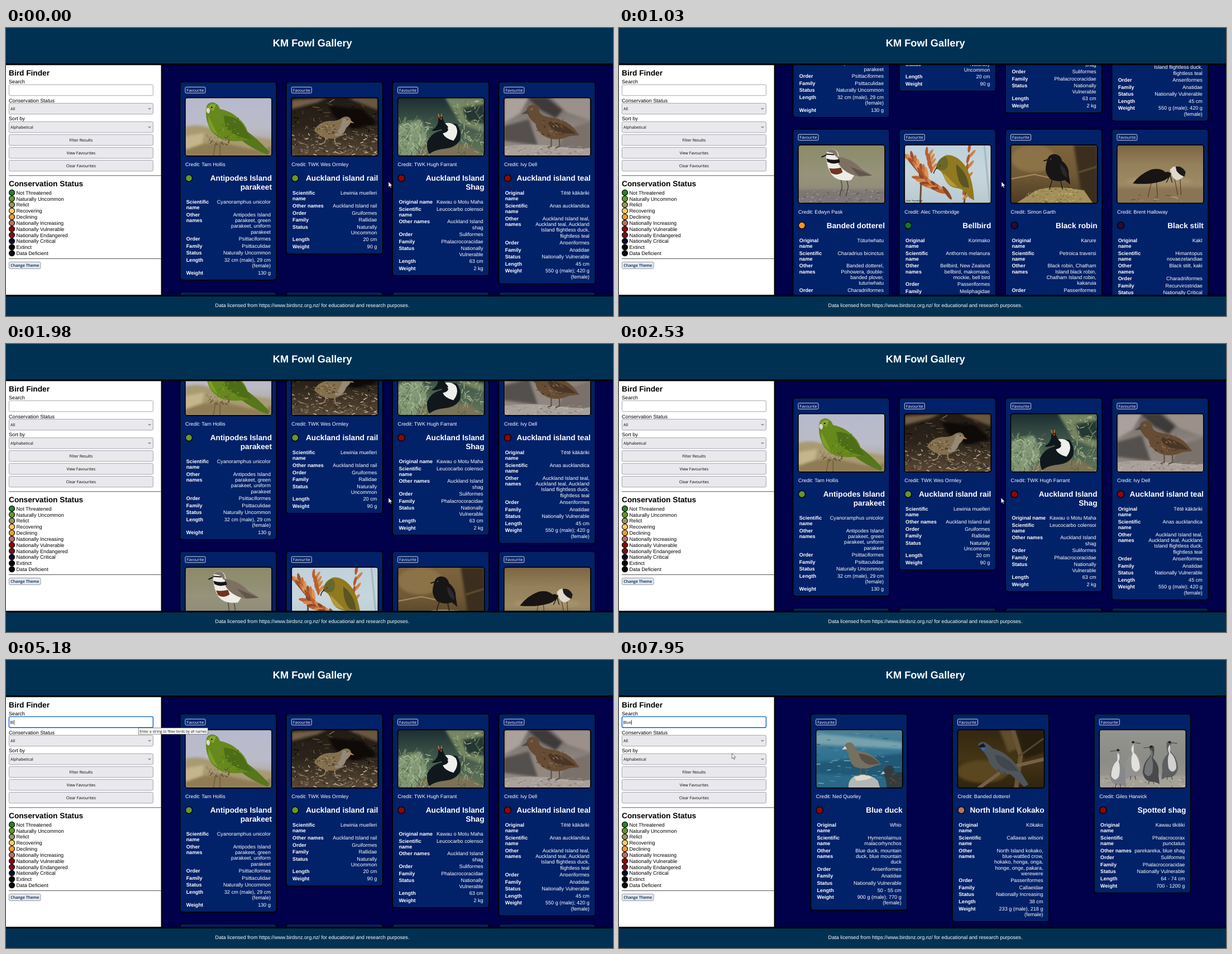
These frames come from a looping animation (1087x515 px, 8 s). An HTML page:

```html
<!DOCTYPE html>
<html lang="en">
<head>
<meta charset="utf-8">
<title>Bird list</title>
<style>
html, body { margin: 0; width: 100%; height: 100%; overflow: hidden; background: #00004b; }
svg { display: block; }
#stage { width: 100%; height: 100%; }
text { font: 9.12px "Liberation Sans", Arial, sans-serif; fill: #000; text-rendering: geometricPrecision; }
.w { fill: #fff; }
.b { font-weight: bold; }
.h { font-size: 13.7px; font-weight: bold; }
.big { font-size: 18.25px; font-weight: bold; }
.ui { font: 500 7.1px "Open Sans", "Noto Sans", sans-serif; }
.theme { font-weight: 600; fill: #012145; }
.tip { font-size: 6.5px; }
.mark { font-size: 3.6px; }
.soft { filter: blur(2px); }
</style>
</head>
<body>
<svg id="stage" viewBox="0 0 1087 515"></svg>
<script>
const LINE = 10.25, GAP = 2.3;
let ids = 0, seed = 7;
const rnd = () => (seed = (seed * 16807) % 2147483647) / 2147483647;

// Drawing helpers, all returning SVG markup
const text = (x, y, s, cls = '', anchor = 'start', more = '') =>
  `<text x="${x}" y="${y}" class="${cls}" text-anchor="${anchor}" ${more}>${s}</text>`;
const rect = (x, y, w, h, fill, more = '') =>
  `<rect x="${x}" y="${y}" width="${w}" height="${h}" fill="${fill}" ${more}/>`;
const shape = (fill, d) => `<path d="${d}" fill="${fill}"/>`;
const line = (color, w, d) =>
  `<path d="${d}" fill="none" stroke="${color}" stroke-width="${w}" stroke-linecap="round" stroke-linejoin="round"/>`;
const oval = (fill, x, y, rx, ry = rx, turn = 0) =>
  `<ellipse cx="${x}" cy="${y}" rx="${rx}" ry="${ry}" fill="${fill}" transform="rotate(${turn} ${x} ${y})"/>`;
const soft = (...parts) => `<g class="soft">${parts.join('')}</g>`;
function sky(...colors) {
  const id = 'g' + ids++;
  const stops = colors.map((c, i) => `<stop offset="${i / (colors.length - 1)}" stop-color="${c}"/>`).join('');
  return `<linearGradient id="${id}" x2="0" y2="1">${stops}</linearGradient>` + rect(0, 0, 154, 103, `url(#${id})`);
}
function specks(n, colors, x, y, w, h, len, tall = 0.4) {
  let out = '';
  for (let i = 0; i < n; i++) {
    const a = x + rnd() * w, b = y + rnd() * h, dx = (rnd() - 0.5) * len, dy = (rnd() - 0.5) * len * tall;
    out += line(colors[i % colors.length], 0.6 + rnd() * 1.2, `M${a.toFixed(1)} ${b.toFixed(1)}l${dx.toFixed(1)} ${dy.toFixed(1)}`);
  }
  return out;
}
// Petals fanned out along a straight stem
function petals(n, colors, x1, y1, x2, y2, size, turn) {
  let out = '';
  for (let i = 0; i < n; i++) {
    const u = i / (n - 1), side = i % 2 ? 1 : -1;
    out += oval(colors[i % colors.length], x1 + (x2 - x1) * u + side * size * 0.3, y1 + (y2 - y1) * u - rnd() * 4,
      size * (0.8 + rnd() * 0.4), size * 0.28, turn + side * 18 + rnd() * 16);
  }
  return out;
}

const pics = {
  parakeet: () => sky('#b7b9cd', '#bbbcc9', '#a79c80') +
    soft(shape('#a89a72', 'M0 52Q24 44 50 56T100 66L154 74V103H0Z'), shape('#8f7c55', 'M0 88Q50 74 96 86T154 84V103H0Z'),
      shape('#c4b58c', 'M0 68L34 62L30 82L0 92Z')) +
    line('#6e6037', 1.6, 'M54 80L50 103M62 80L62 103') +
    shape('#56771b', 'M88 58L108 58Q128 72 149 95L147 101Q118 90 98 74Z') +
    shape('#66881c', 'M37 22Q37 8 49 8Q58 9 62 20Q86 24 104 46Q114 60 112 74Q88 80 66 74Q46 64 41 48Q36 36 37 22Z') +
    shape('#4d6d17', 'M68 32Q92 32 104 50L118 74Q86 70 72 52Z') + shape('#86a52c', 'M40 16Q46 8 55 12L50 24Z') +
    shape('#7d9d27', 'M41 32Q46 42 58 66Q44 58 41 44Z') + specks(30, ['#7a9b27', '#486916'], 62, 34, 36, 36, 6, 0.8) +
    shape('#d8d8d0', 'M38 19Q42 16 44 21Q44 27 41 28Q36 25 38 19Z') + oval('#111', 47, 17, 1.3) +
    specks(40, ['#7a6a45', '#5d4d36', '#96835a'], 40, 68, 38, 15, 9, 1),
  rail: () => sky('#221b14', '#2c241b', '#5a4a36') +
    specks(70, ['#574731', '#0d0a08', '#786449'], 0, 0, 154, 60, 26) +
    soft(shape('#735f47', 'M0 4L64 0L46 8L0 20Z'), shape('#0d0a08', 'M66 14L126 20L154 46L110 56L76 34Z'), shape('#6a573f', 'M100 0H154V22L128 12Z')) +
    specks(190, ['#796750', '#a29178', '#33281d', '#c0b298'], 0, 64, 154, 38, 14) +
    line('#a08a66', 1.6, 'M62 72L58 80L50 82M76 70L78 80L88 82') +
    shape('#84704f', 'M40 58Q48 43 66 41Q82 42 90 35Q102 30 106 39Q106 48 97 53Q94 68 76 72Q56 75 40 58Z') +
    shape('#958a78', 'M91 37Q104 35 104 44Q98 52 92 62Q84 71 76 66Q88 56 91 37Z') +
    specks(40, ['#463827', '#65533a', '#a08a65'], 46, 46, 36, 18, 8) +
    shape('#b07c58', 'M104 39L112 45L102 44Z') + oval('#111', 99, 39, 1),
  shag: () => sky('#1c2e31', '#435a4c', '#64785a') +
    soft(shape('#768662', 'M84 0H154V62L112 46Z'), shape('#243732', 'M114 18L154 12V46L124 42Z'),
      shape('#839877', 'M0 48L40 38L54 66L40 103H0Z'), shape('#7c7256', 'M44 86L124 82L154 103H30Z')) +
    specks(150, ['#9bb08d', '#4a6347', '#b3bd9b', '#678359'], 0, 40, 60, 62, 18, 1.3) +
    specks(90, ['#8da07c', '#4b6145', '#aab392'], 104, 5, 50, 94, 16, 1.2) +
    shape('#10181d', 'M53 76Q60 62 78 58Q90 44 104 46Q114 56 111 74Q104 88 84 90Q64 92 56 100Q50 88 53 76Z') +
    shape('#eeeeea', 'M79 47Q92 41 103 50Q110 62 99 76Q84 72 80 63Q92 60 89 54Q84 53 78 56Z') +
    shape('#10171b', 'M72 34Q79 29 81 39Q84 46 90 52Q84 58 76 56Q66 60 60 58Q74 50 72 34Z') +
    line('#e1763a', 1.5, 'M74 35L72 29M77 34L78 29') + oval('#c04430', 77, 37, 1.5),
  teal: () => sky('#6d6662', '#8f8680', '#928983') +
    soft(shape('#aaa19b', 'M0 0H44L28 28L0 44Z'), shape('#3e3a39', 'M42 0H76L104 22L92 36L66 22Z'),
      shape('#9b918a', 'M84 0H154V40L112 26Z'), shape('#54504d', 'M0 50L44 38L60 84L0 76Z'), shape('#7a716b', 'M110 56L154 42V92H96Z')) +
    shape('#aaa19a', 'M0 86Q46 80 92 86T154 88V103H0Z') + specks(70, ['#c1b8b1', '#817873', '#958c86'], 0, 86, 154, 17, 10) +
    line('#5a4c41', 2, 'M84 70L84 86L78 88M98 68L99 86L92 89') +
    shape('#664c35', 'M40 22Q42 12 52 12Q62 13 63 25Q66 32 80 34Q112 38 126 56L134 66L116 68Q94 78 76 70Q58 62 56 46Q42 36 40 22Z') +
    shape('#4a3626', 'M78 42Q104 42 128 64L102 62Q82 58 78 42Z') + specks(60, ['#92745a', '#432f21', '#785b44'], 60, 38, 46, 30, 7, 0.7) +
    shape('#4c4948', 'M42 21L31 29L45 28Z') + oval('#eee', 49, 20, 1.5) + oval('#111', 49, 20, 1),
  dotterel: () => sky('#8b8a68', '#96937a', '#8a867b') + soft(rect(0, 79, 154, 24, '#7c7774')) +
    specks(110, ['#a39d98', '#5c5856', '#8d8681'], 0, 80, 154, 22, 6) +
    line('#4d4842', 1.5, 'M76 60L78 74L74 89M86 60L89 74L85 90') +
    shape('#eeece7', 'M49 18Q51 7 60 7Q71 8 72 20Q94 29 106 44L94 62Q70 66 59 52Q51 40 49 18Z') +
    shape('#7d7062', 'M70 20Q96 24 112 42L132 54L110 56Q84 52 72 34Z') + shape('#62564c', 'M92 38L112 46L131 54L108 55Z') +
    shape('#84776a', 'M51 12Q57 4 66 9Q72 15 70 23L61 14Z') +
    shape('#171514', 'M50 24Q62 28 73 25L74 31Q62 35 52 30Z') + shape('#6e351f', 'M55 41Q64 43 76 40L79 48Q67 56 58 49Z') +
    line('#1c1917', 2, 'M49 18L42 21M50 16L63 17'),
  bellbird: () => sky('#bfd1da', '#c7d6dc', '#b8c9d0') +
    line('#a4bac2', 3, 'M142 0L152 103') +
    line('#6d4a36', 3, 'M4 22L30 54L78 88M112 60L106 103M30 54L28 103') +
    petals(12, ['#c8743c', '#a3502b', '#de9355'], 8, 22, 36, 54, 11, 60) +
    petals(14, ['#b9602f', '#8c4526', '#d58548'], 28, 62, 72, 86, 12, 22) +
    petals(9, ['#b9602f', '#d58548'], 42, 14, 50, 44, 9, 100) +
    petals(10, ['#ad5a30', '#cf8048'], 118, 8, 108, 92, 9, 110) +
    shape('#90791f', 'M56 42Q58 24 74 18Q94 16 110 40Q122 62 124 98L115 93Q108 78 92 76Q76 74 70 56Q66 44 56 42Z') +
    shape('#6a672a', 'M56 41Q58 25 72 20Q80 26 76 40Q70 46 63 44Z') + shape('#5a5523', 'M92 34Q112 48 115 76L104 74Q92 62 92 34Z') +
    shape('#b09b3c', 'M70 50Q84 64 94 74Q76 74 70 56Z') + line('#24211b', 1.5, 'M58 40Q53 44 52 50') + oval('#8d2218', 63, 37, 1.4) +
    text(2, 100, '©Alec Thornbridge', 'mark'),
  robin: () => sky('#7d643c', '#705936', '#4d3b24') +
    soft(oval('#8b7247', 40, 24, 40, 24), shape('#3b2e1e', 'M112 0H154V103H128Z')) +
    line('#a3875a', 2.2, 'M0 60L42 52L88 62') + line('#59462b', 4, 'M122 48L154 38') +
    shape('#a3905a', 'M10 103L42 82Q64 72 98 76L130 80L146 103Z') + specks(100, ['#c8b67b', '#6f6036', '#8d7c49'], 30, 77, 100, 25, 9) +
    line('#231e19', 1.6, 'M74 60L69 78M88 60L92 78') +
    shape('#171516', 'M64 30Q66 16 78 16Q89 17 91 28Q104 38 103 52L106 70L96 62Q84 67 70 60Q58 48 64 30Z') +
    shape('#2b282a', 'M88 34Q102 44 100 58Q88 52 88 34Z') + line('#111', 1.8, 'M65 26L59 28') + oval('#6b625a', 71, 25, 1.1),
  stilt: () => sky('#7a6540', '#94805a', '#9d8963', '#84704f') +
    soft(rect(0, 76, 154, 27, '#897556'), oval('#a4916d', 76, 64, 60, 8)) +
    line('#58331f', 1.1, 'M62 62L55 92M70 62L72 93M102 58L108 88M112 58L114 88') +
    shape('#171413', 'M28 68Q42 50 62 43Q78 40 86 48Q94 46 96 52Q92 60 80 64Q56 71 28 68Z') +
    shape('#dfd9cc', 'M94 44Q100 36 108 38Q120 44 120 52Q116 62 106 62Q98 60 94 44Z') +
    shape('#1d1a19', 'M104 38Q116 36 122 48L120 56Q112 54 106 46Z') + line('#171413', 1.3, 'M94 52L98 66M96 50L88 66') +
    specks(16, ['#65553c', '#b29e78'], 28, 88, 92, 12, 18, 0.05),
  duck: () => sky('#4c8199', '#2e718f', '#296684') +
    soft(shape('#77a2ad', 'M0 6L154 22V34L0 26Z'), shape('#205876', 'M0 58L154 42V84L0 78Z')) +
    specks(66, ['#75a7b8', '#245f7d', '#468ba5'], 0, 4, 154, 92, 22, 0.1) +
    shape('#b4b8b2', 'M58 103Q56 84 78 79Q98 78 110 90L114 103Z') + shape('#dadbd3', 'M68 84Q82 77 100 84Q92 90 72 90Z') +
    line('#635848', 2, 'M80 66L79 79L73 81M88 66L90 80') +
    shape('#76705f', 'M51 28Q54 21 63 23Q70 26 70 36Q94 38 110 54L116 61L104 64Q88 72 70 66Q58 58 58 40Q51 36 51 28Z') +
    shape('#575044', 'M76 42Q100 44 114 60L96 62Q80 58 76 42Z') + shape('#ded7cd', 'M52 29L46 35L55 34Z') +
    shape('#323c3f', 'M119 76Q122 62 134 63Q140 66 139 76L154 75V103H126Q126 88 119 76Z') + shape('#c0beb6', 'M120 73L115 79L123 78Z') +
    specks(14, ['#694e3d'], 130, 76, 22, 20, 6),
  kokako: () => sky('#332711', '#443516', '#2e240f') +
    soft(oval('#5a461f', 44, 74, 46, 20), shape('#5f4d2c', 'M74 0H100L106 34L90 40Z'), shape('#271e0e', 'M106 0H154V40L118 52Z')) +
    line('#695536', 8, 'M98 0L112 46L104 103') + line('#756045', 6, 'M38 103L86 68L154 52') + line('#55452b', 3, 'M110 46L152 16') +
    shape('#4e555b', 'M36 28Q38 20 48 22Q56 26 62 33Q90 40 108 68L126 97L118 101L94 79Q70 78 57 60Q52 42 36 28Z') +
    shape('#3f464c', 'M66 44Q92 48 108 74L92 72Q70 66 66 44Z') + shape('#17191b', 'M36 29L46 24L50 30L42 32Z') +
    oval('#2b68c4', 45, 34, 3.4, 2.8, 30) + line('#4a4238', 1.6, 'M72 70L79 80M82 74L88 80'),
  shags: () => sky('#94958f', '#8b8c86', '#9b9990') +
    soft(rect(0, 82, 154, 21, '#a5a197')) + specks(40, ['#c2beb3', '#7c7a72'], 0, 86, 154, 16, 12, 0.2) +
    [[32, 36, '#88888a', '#dededb'], [61, 22, '#929292', '#e2e1dc'], [91, 30, '#47494b', '#737577'], [126, 22, '#5d6061', '#d1d2cf']].map(([x, y, back, front], i) => {
      const s = i % 2 ? -1 : 1;
      return `<g transform="translate(${x} ${y}) scale(${s} 1)">` +
        shape(back, 'M-3 1Q1 -5 6 0Q8 11 4 20Q17 32 14 50L16 66L7 62Q-11 64 -14 45Q-13 28 -2 18Q3 10 -3 1Z') +
        shape(front, 'M0 4Q7 10 2 20Q6 30 3 46Q-4 58 -11 46Q-11 28 0 18Z') +
        line('#4d4b43', 1.2, 'M-3 1L-12 2M-2 60L-4 66M5 60L6 66') + oval('#202020', 1, 0, 2.6, 2) + '</g>';
    }).join('')
};

const GREEN = '#659629', RED = '#8d0705', DARK = '#2b0b31';
const SCI = 'Scientific/name|', OTH = 'Other/names|', ORI = 'Original/name|';
// pic, credit, dot, title, table rows ("/" breaks a line)
const found = [
  ['parakeet', 'Tarn Hollis', GREEN, 'Antipodes Island/parakeet', [SCI + 'Cyanoramphus unicolor',
    OTH + 'Antipodes Island/parakeet, green/parakeet, uniform/parakeet', 'Order|Psittaciformes', 'Family|Psittaculidae',
    'Status|Naturally Uncommon', 'Length|32 cm (male), 29 cm/(female)', 'Weight|130 g']],
  ['rail', 'TWK Wes Ormley', GREEN, 'Auckland island rail', [SCI + 'Lewinia muelleri', 'Other names|Auckland Island rail',
    'Order|Gruiformes', 'Family|Rallidae', 'Status|Naturally/Uncommon', 'Length|20 cm', 'Weight|90 g']],
  ['shag', 'TWK Hugh Farrant', RED, 'Auckland Island/Shag', ['Original name|Kawau o Motu Maha', SCI + 'Leucocarbo colensoi',
    'Other names|Auckland Island/shag', 'Order|Suliformes', 'Family|Phalacrocoracidae', 'Status|Nationally/Vulnerable',
    'Length|63 cm', 'Weight|2 kg']],
  ['teal', 'Ivy Dell', RED, 'Auckland island teal', [ORI + 'Tētē kākāriki', SCI + 'Anas aucklandica',
    OTH + 'Auckland Island teal,/Auckland teal, Auckland/Island flightless duck,/flightless teal', 'Order|Anseriformes',
    'Family|Anatidae', 'Status|Nationally Vulnerable', 'Length|45 cm', 'Weight|550 g (male); 420 g/(female)']],
  ['dotterel', 'Edwyn Pask', '#fb931f', 'Banded dotterel', [ORI + 'Tūturiwhatu', SCI + 'Charadrius bicinctus',
    OTH + 'Banded dotterel,/Pohowera, double-/banded plover,/tuturiwhatu', 'Order|Charadriiformes', 'Family|Charadriidae', 'Status|Declining']],
  ['bellbird', 'Alec Thornbridge', '#0c7a22', 'Bellbird', [ORI + 'Korimako', SCI + 'Anthornis melanura',
    OTH + 'Bellbird, New Zealand/bellbird, makomako,/mockie, bell bird', 'Order|Passeriformes', 'Family|Meliphagidae', 'Status|Not Threatened']],
  ['robin', 'Simon Garth', DARK, 'Black robin', [ORI + 'Karure', SCI + 'Petroica traversi',
    OTH + 'Black robin, Chatham/Island black robin,/Chatham Island robin,/kakaruia', 'Order|Passeriformes', 'Family|Petroicidae', 'Status|Nationally Critical']],
  ['stilt', 'Brent Halloway', DARK, 'Black stilt', [ORI + 'Kakī', SCI + 'Himantopus/novaezelandiae', OTH + 'Black stilt, kaki',
    'Order|Charadriiformes', 'Family|Recurvirostridae', 'Status|Nationally Critical', 'Length|40 cm']]
];
const blue = [
  ['duck', 'Ned Quorley', RED, 'Blue duck', [ORI + 'Whio', SCI + 'Hymenolaimus/malacorhynchos', OTH + 'Blue duck, mountain/duck, blue mountain/duck',
    'Order|Anseriformes', 'Family|Anatidae', 'Status|Nationally Vulnerable', 'Length|50 - 55 cm', 'Weight|900 g (male); 770 g/(female)']],
  ['kokako', 'Banded dotterel', '#b87068', 'North Island Kokako', [ORI + 'Kōkako', SCI + 'Callaeas wilsoni',
    OTH + 'North Island kokako,/blue-wattled crow,/hokako, honga, onga,/honge, onge, pakara,/werewere', 'Order|Passeriformes',
    'Family|Callaeidae', 'Status|Nationally Increasing', 'Length|38 cm', 'Weight|233 g (male), 218 g/(female)']],
  ['shags', 'Giles Harwick', RED, 'Spotted shag', [ORI + 'Kawau tikitiki', SCI + 'Phalacrocorax/punctatus', 'Other names|parekareka, blue shag',
    'Order|Suliformes', 'Family|Phalacrocoracidae', 'Status|Nationally Vulnerable', 'Length|64 - 74 cm', 'Weight|700 - 1200 g']]
];

function card(x, y, [pic, credit, dot, title, rows]) {
  const heads = title.split('/');
  let out = heads.map((s, i) => text(165, 177.7 + i * 15.9, s, 'h w', 'end')).join('');
  let top = 202.7 + (heads.length - 1) * 15.9;
  for (const row of rows) {
    const [th, td] = row.split('|').map(s => s.split('/'));
    th.forEach((s, i) => out += text(11.8, top + i * LINE, s, 'b w'));
    td.forEach((s, i) => out += text(163, top + i * LINE, s, 'w', 'end'));
    top += Math.max(th.length, td.length) * LINE + GAP;
  }
  const frame = 'stroke="#000" stroke-width="1.8"';
  return `<g transform="translate(${x} ${y})">` +
    rect(0.5, 0.8, 172.9, top - 3.2, '#012169', `rx="5" ${frame}`) +
    rect(10, 10.2, 36, 10.6, 'none', 'rx="1.6" stroke="#e6eaf4" stroke-width=".9"') + text(12.5, 18.1, 'Favourite', 'ui w') +
    `<svg x="10" y="29.3" width="155" height="104" viewBox="0 0 154 103" preserveAspectRatio="none">${pics[pic]()}</svg>` +
    rect(9.9, 29.2, 155.2, 104.2, 'none', `rx="4" ${frame}`) +
    text(10, 151.8, 'Credit: ' + credit, 'w') +
    `<circle cx="16.5" cy="173" r="6.1" fill="${dot}" stroke="#000" stroke-width="1.4"/>${out}</g>`;
}

const legend = [['Not Threatened', '#2b7d2b'], ['Naturally Uncommon', '#659629'], ['Relict', '#97975f'], ['Recovering', '#fdcb62'],
  ['Declining', '#f59a31'], ['Nationally Increasing', '#b87068'], ['Nationally Vulnerable', '#8d0705'], ['Nationally Endangered', '#76101a'],
  ['Nationally Critical', '#0a0a2c'], ['Extinct', '#050505'], ['Data Deficient', '#0a0a0a']];

const field = (y, fill) => rect(5.4, y, 258, 19.4, fill, 'rx="2" stroke="#8f8f9d" stroke-width=".8"');
const select = (y, s) => field(y, '#e9e9ed') + text(8, y + 12.3, s, 'ui') +
  line('#222', 0.9, `M255 ${y + 8.7}l2 2 2-2`);
const button = (y, s) => field(y, '#e9e9ed') + text(134.3, y + 12.2, s, 'ui', 'middle');

const sidebar = rect(0, 66, 280, 412, '#000') + rect(0, 66, 277.6, 412, '#fff') +
  text(5, 85, 'Bird Finder', 'h') + text(5, 99.3, 'Search') +
  rect(5.4, 101.4, 258, 19.4, '#fff', 'id="input" rx="2"') + text(7.2, 113.7, '', 'ui', 'start', 'id="typed"') +
  rect(0, 107.3, 0.7, 8.6, '#000', 'id="caret"') +
  text(5, 132.5, 'Conservation Status') + select(134.6, 'All') + text(5, 165.4, 'Sort by') + select(167.6, 'Alphabetical') +
  button(190.6, 'Filter Results') + button(213.6, 'View Favourites') + button(236.5, 'Clear Favourites') +
  rect(5, 263.4, 272.6, 1, '#555') + text(5, 283.4, 'Conservation Status', 'h') +
  legend.map(([s, c], i) => {
    const y = 294.4 + i * 10.84;
    return `<circle cx="10.5" cy="${y}" r="5" fill="${c}" stroke="#000" stroke-width="1.1"/>` + text(18.5, y + 3.3, s);
  }).join('') +
  rect(5, 412, 272.6, 1, '#555') + rect(5.4, 418.4, 56.6, 12, '#e4e8ef', 'rx="2" stroke="#7c8391" stroke-width=".8"') +
  text(33.7, 427, 'Change Theme', 'ui theme', 'middle');

const stage = document.getElementById('stage');
stage.innerHTML =
  '<clipPath id="view"><rect x="280" y="66" width="807" height="412"/></clipPath>' +
  rect(0, 0, 1087, 515, '#00004b') +
  `<g clip-path="url(#view)"><g id="all">${found.map((b, i) => card(311 + (i % 4) * 190.3, i < 4 ? 95.5 : 471, b)).join('')}</g>` +
  `<g id="hits">${blue.map((b, i) => card(342.7 + i * 253.8, 95.5, b)).join('')}</g></g>` +
  sidebar +
  rect(0, 0, 1087, 64, '#003153') + rect(0, 63.4, 1087, 3, '#000') + text(548.7, 32.8, 'KM Fowl Gallery', 'big w', 'middle') +
  rect(0, 477, 1087, 38, '#003153') + rect(0, 477, 1087, 3, '#000') +
  text(548.5, 498.6, 'Data licensed from https://www.birdsnz.org.nz/ for educational and research purposes.', 'w', 'middle') +
  '<g id="tip">' + rect(237.2, 121.4, 124.4, 11.4, '#fff', 'stroke="#555" stroke-width=".7"') +
  text(239.2, 129.5, 'Enter a string to filter birds by all names', 'ui tip') + '</g>' +
  '<path id="arrow" d="M0 0V9.4L2.2 7.4L3.7 10.8L5.2 10.1L3.7 6.9H6.7Z" fill="#fff" stroke="#222" stroke-width=".6"/>' +
  '<path id="beam" d="M-2-5.3Q0-5.3 0-4Q0-5.3 2-5.3M0-4V4M-2 5.3Q0 5.3 0 4Q0 5.3 2 5.3" fill="none" stroke="#111" stroke-width=".8"/>';

const $ = id => document.getElementById(id);
const show = (id, on) => $(id).setAttribute('visibility', on ? 'visible' : 'hidden');
const move = (id, x, y) => $(id).setAttribute('transform', `translate(${x} ${y})`);
const down = [0, 5, 20, 49.5, 105, 178, 249, 291];
const up = [291, 286, 271, 244, 204, 154, 101, 50, 15, 0];

// Completed steps of a stepped move
const steps = (t, from, each, max) => Math.max(0, Math.min(max, 1 + Math.floor((t - from) / each)));
const ease = u => u * u * (3 - 2 * u);

function pointer(t) {
  if (t < 2530) return [685, 275];
  if (t < 2610) return [684.2, 275];
  if (t < 3730) {
    const u = ease(steps(t, 2850, 80, 11) / 11);
    return [682.6 - 439.1 * u, 275 - 160 * u];
  }
  if (t < 4050) return [243.5, 112.8];
  const u = ease(steps(t, 7150, 80, 11) / 11);
  return [236.5 - 34.3 * u, 110 + 57 * u];
}

function draw(t) {
  const scroll = t < 1580 ? down[steps(t, 550, 80, 7)] : up[steps(t, 1580, 78.7, 9)];
  move('all', 0, -scroll);
  show('all', t < 6200);
  show('hits', t >= 6200);

  const [x, y] = pointer(t);
  const inside = x < 264 && y > 101 && y < 121;
  const shown = t < 4780 || t >= 7150;
  move('arrow', x, y);
  move('beam', x, y);
  show('arrow', shown && !inside);
  show('beam', shown && inside);

  const focus = t >= 3890;
  $('input').setAttribute('stroke', focus ? '#0560d6' : inside ? '#67676f' : '#8f8f9d');
  $('input').setAttribute('stroke-width', focus ? 1.4 : 0.8);
  const n = [4780, 5180, 5400, 5560].filter(s => t >= s).length;
  $('typed').textContent = 'Blue'.slice(0, n);
  $('caret').setAttribute('x', [7.2, 11.9, 14, 18.1, 22.1][n]);
  const off = (t >= 4530 && t < 4780) || (t >= 6040 && t < 6600) || (t >= 7150 && t < 7630);
  show('caret', focus && !off);
  show('tip', t >= 4530 && t < 7150);
}

function tick() {
  draw(performance.now() % 8000);
  requestAnimationFrame(tick);
}
tick();
</script>
</body>
</html>
```
